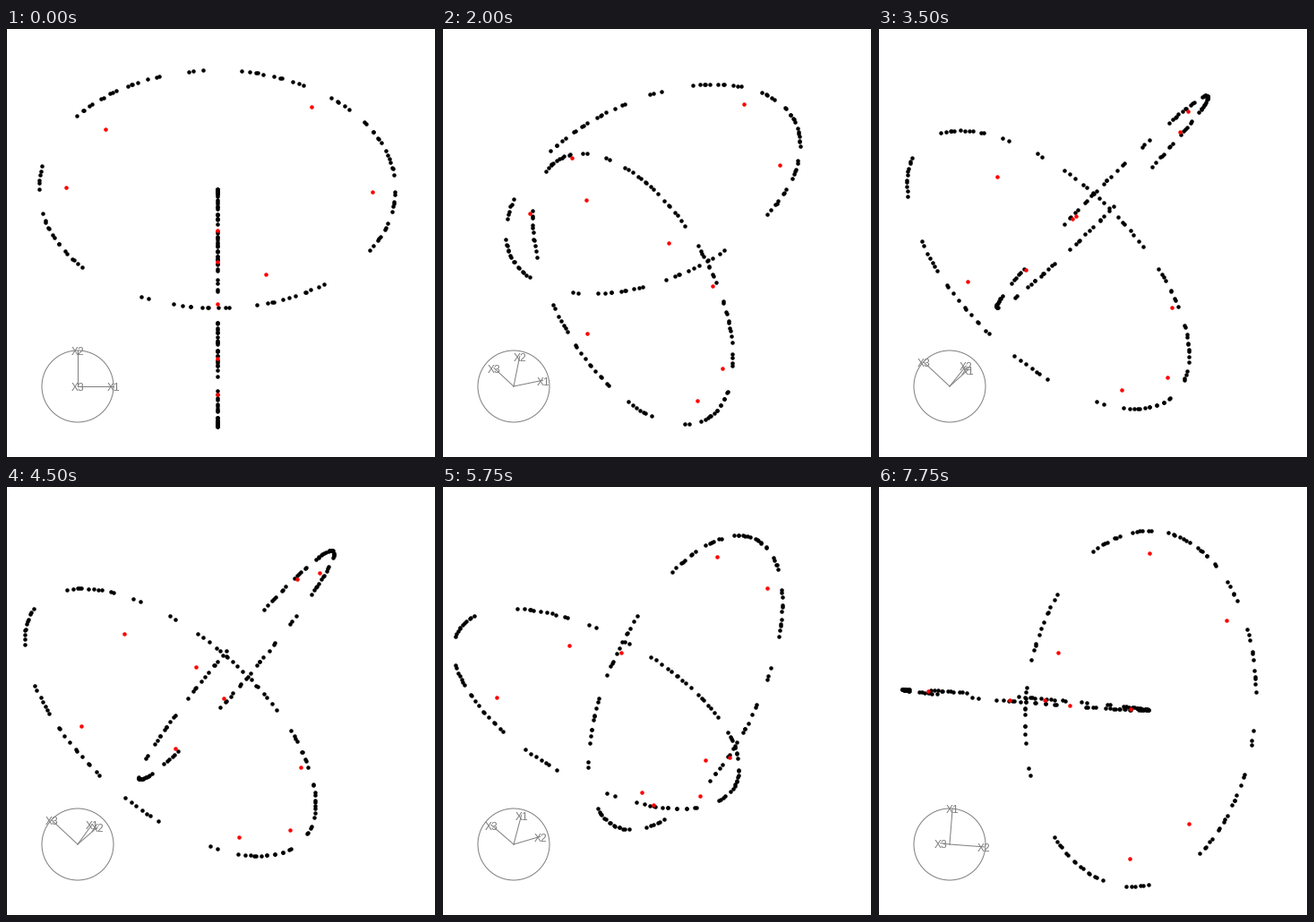
Write a matplotlib script that moves like this. It is 480 px wide and 480 px high and loops after 8 s.

```python
import numpy as np
import matplotlib.pyplot as plt
from matplotlib.animation import FuncAnimation

SIZE, DPI = 480, 80
PX = 72 / DPI                      # one pixel in points
GREY = "#7f7f7f"
FRAMES, INTERVAL = 32, 250
LONG, SHORT = 199, 132.7           # ring half-axes
KEY_X, KEY_Y, KEY_R = 80, 400, 40  # axis key
SPACING = 2.1                      # mean step between dots, degrees

rng = np.random.default_rng(4)


def scatter(arcs):
    """Uneven angles along each arc, with a dot at both ends."""
    runs = []
    for start, end in arcs:
        n = max(2, round((end - start) / SPACING) + 1)
        run = np.linspace(start, end, n)
        run[1:-1] += rng.uniform(-0.7, 0.7, n - 2) * SPACING
        runs.append(run)
    return np.concatenate(runs)


def ring(center, cos_axis, sin_axis, degrees, radius=1):
    a = np.radians(degrees)
    flat = np.outer(np.cos(a), cos_axis) + np.outer(np.sin(a), sin_axis)
    return np.array(center) + flat * np.reshape(radius, (-1, 1))


def flat_ring(degrees, radius=1):
    return ring((-4.5, 60.3, 20.5), (LONG, 0, 0), (0, SHORT, 0),
                degrees, radius)


def upright_ring(degrees, radius=1):
    return ring((-4.5, -72.4, 20.5), (0, SHORT, 0), (0, 0, LONG),
                degrees, radius)


DOTS = np.vstack([
    flat_ring(scatter([
        (-168, -139), (-115, -112.5), (-104, -86), (-77, -53), (-31, -17),
        (-11, -1.4), (7, 34), (42, 50), (61, 82), (94.5, 99), (109, 142),
        (169, 180)])),
    upright_ring(scatter([
        (-3, 16), (25, 27), (38.7, 41.5), (50, 72), (97, 119), (139, 151),
        (157, 178), (189, 202.5), (223, 226), (235, 263), (278, 283.5),
        (289, 307), (315, 331), (340, 353)])),
])
# Nodes sit just inside the rings; the last one hangs between them.
NODES = np.vstack([
    flat_ring([52.4, -1.5, 141.4, 179.3], [0.87, 0.873, 0.8, 0.848]),
    upright_ring([-46.4, 55, -88, -119.8, 157], [0.94, 0.67, 0.91, 0.865, 0.793]),
    (50, -34.5, 39.5),
])


def tilt(axis_deg, angle_deg):
    """Rotation about an axis that lies in the screen plane."""
    c, s = np.cos(np.radians(axis_deg)), np.sin(np.radians(axis_deg))
    k, q = np.cos(np.radians(angle_deg)), np.sin(np.radians(angle_deg))
    return np.array([
        [c * c + k * s * s, c * s * (1 - k), -s * q],
        [c * s * (1 - k), s * s + k * c * c, c * q],
        [s * q, -c * q, k],
    ])


def view(i):
    """Tour of two geodesics, with a short rest before the turn."""
    first = np.interp(i, [0, 14, 15, 18], [0, 85.3, 85.8, 96.6])
    second = 5.61 * max(0, i - 18)
    return (tilt(36.4, second) @ tilt(47, first))[:2]


fig = plt.figure(figsize=(SIZE / DPI, SIZE / DPI), dpi=DPI, facecolor="white")
ax = fig.add_axes([0, 0, 1, 1])
ax.set_xlim(0, SIZE)
ax.set_ylim(SIZE, 0)
ax.axis("off")

ax.add_patch(plt.Rectangle((0.5, 0.5), SIZE - 1, SIZE - 1, fill=False,
                           ec="black", lw=PX, snap=False))
ax.add_patch(plt.Circle((KEY_X, KEY_Y), KEY_R, fill=False, ec=GREY, lw=PX))
spokes = [ax.plot([], [], color=GREY, lw=PX)[0] for _ in range(3)]
labels = [ax.text(0, 0, f"X{n}", color=GREY, family="Liberation Sans",
                  size=12 * PX, ha="center", va="baseline", zorder=3)
          for n in (1, 2, 3)]


def dot_layer(color, z):
    return ax.plot([], [], "o", ms=4.5 * PX, mew=0, color=color, zorder=z)[0]


black, red = dot_layer("black", 4), dot_layer("red", 5)


def draw(i):
    m = view(i)
    for layer, pts in ((black, DOTS), (red, NODES)):
        x, y = m @ pts.T
        layer.set_data(SIZE / 2 + x, SIZE / 2 - y)
    for spoke, label, (dx, dy) in zip(spokes, labels, m.T):
        x, y = KEY_X + KEY_R * dx, KEY_Y - KEY_R * dy
        spoke.set_data([KEY_X, x], [KEY_Y, y])
        label.set_position((x, y + 5.3))
    return [black, red, *spokes, *labels]


anim = FuncAnimation(fig, draw, frames=FRAMES, interval=INTERVAL,
                     init_func=lambda: draw(0), repeat=True, repeat_delay=0)
plt.show()
```
